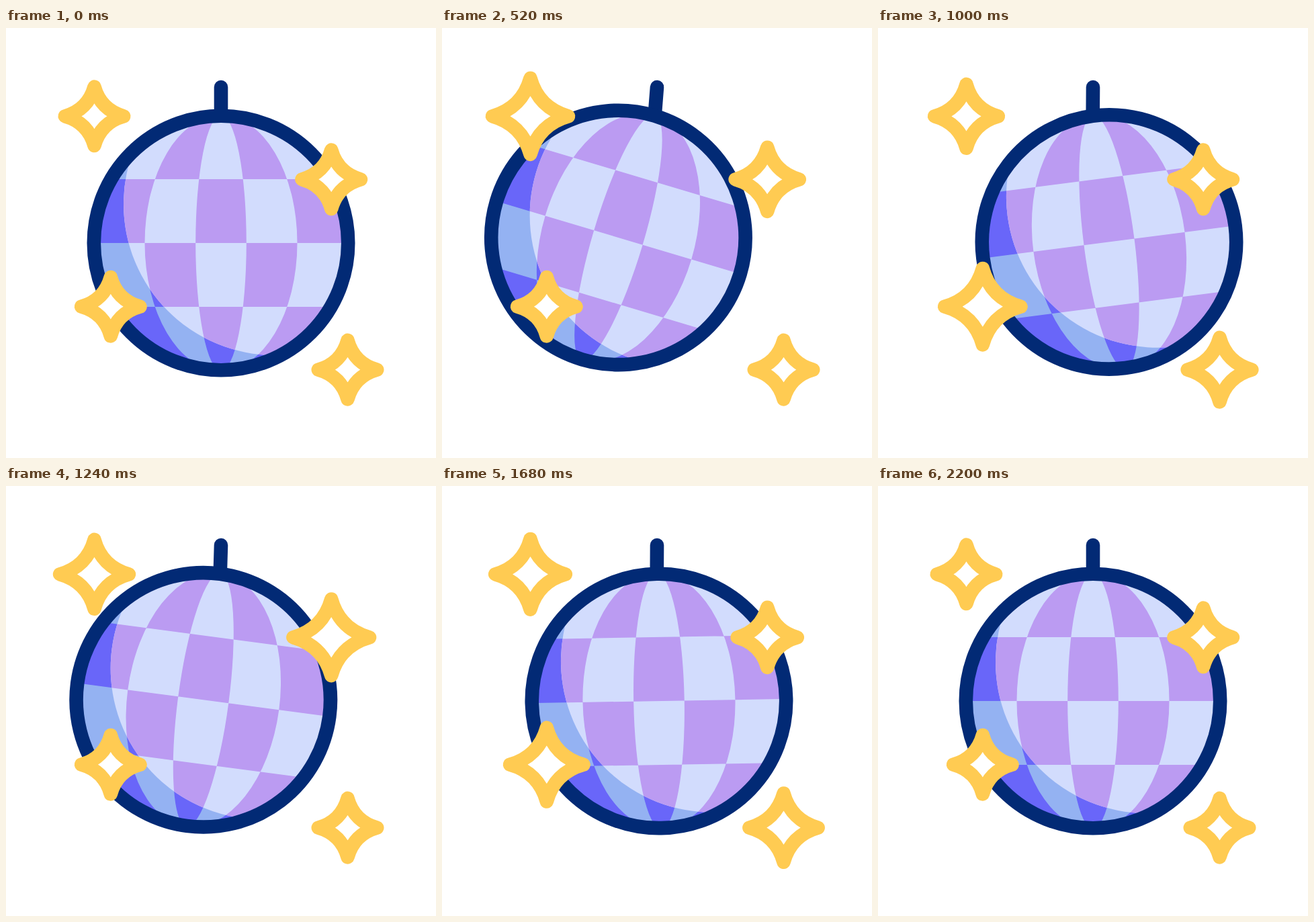
These frames come from a looping animation (640x640 px, 2240 ms). An HTML page:

```html
<!DOCTYPE html>
<html lang="en">
<head>
<meta charset="utf-8">
<title>Disco ball</title>
<style>
  html, body { margin: 0; width: 100%; height: 100%; overflow: hidden; background: #fff; }
  svg { display: block; width: 100vw; height: 100vh; }
  .line { fill: none; stroke: #022a75; stroke-width: 20.6; stroke-linecap: round; }
  .star { fill: #fff; stroke: #ffcb52; stroke-linejoin: round; }
</style>
</head>
<body>
<svg viewBox="0 0 640 640">
  <defs>
    <clipPath id="inside"><circle cx="320" cy="320" r="184"/></clipPath>
    <clipPath id="lit"><circle cx="400" cy="262" r="225"/></clipPath>
    <!-- Overlapping ellipses and bands give the checks through the even-odd rule -->
    <path id="checks" fill-rule="evenodd" d="
      M206.5 320a113.5 190 0 0 1 227 0a113.5 190 0 0 1 -227 0z
      M282.2 320a37.8 190 0 0 1 75.6 0a37.8 190 0 0 1 -75.6 0z
      M120 225h400v95h-400z M120 415h400v100h-400z"/>
  </defs>
  <path id="rod" class="line" d="M320 88V130"/>
  <g id="ball">
    <g clip-path="url(#inside)">
      <rect x="120" y="120" width="400" height="400" fill="#94b2f2"/>
      <use href="#checks" fill="#6966f9"/>
      <g clip-path="url(#lit)">
        <rect x="120" y="120" width="400" height="400" fill="#d2dcfd"/>
        <use href="#checks" fill="#bb9bf2"/>
      </g>
    </g>
    <circle class="line" cx="320" cy="320" r="189.2"/>
  </g>
  <g id="stars"></g>
</svg>
<script>
const LOOP = 2240, STEP = 40, STROKE = 20.6, ROD = 42;
const $ = id => document.getElementById(id);

// [time, degrees] at each turning point; the ball trails the rod
const rodSwing = [[100, 0], [460, 5], [860, -4], [1123, 4], [1440, -3.5], [1800, 1.6], [2120, 0]];
const ballSwing = [[120, 0], [520, 16.6], [908, -12], [1195, 8], [1540, -3], [1850, 1.8], [2160, 0]];

// pulses: [time of peak, half length]
const stars = [
  { x: 131.5, y: 131.3, pulses: [[500, 205], [1142, 220], [1800, 300]] },
  { x: 484.2, y: 225.3, pulses: [[660, 220], [1240, 220], [1865, 220]] },
  { x: 155.8, y: 414.7, pulses: [[237, 220], [985, 220], [1737, 220]] },
  { x: 508.5, y: 508.6, pulses: [[250, 220], [863, 220], [1570, 240]] }
];

function starPath(r, c) {
  return `M0 ${-r}Q${c} ${-c} ${r} 0Q${c} ${c} 0 ${r}Q${-c} ${c} ${-r} 0Q${-c} ${-c} 0 ${-r}z`;
}

for (const star of stars) {
  star.el = document.createElementNS("http://www.w3.org/2000/svg", "path");
  star.el.setAttribute("class", "star");
  star.el.setAttribute("d", starPath(43.7, 9.5));
  $("stars").append(star.el);
}

function swing(keys, t) {
  const i = keys.findIndex(k => k[0] > t);
  if (i < 1) return 0;
  const [t0, a] = keys[i - 1], [t1, b] = keys[i];
  return a + (b - a) * (1 - Math.cos(Math.PI * (t - t0) / (t1 - t0))) / 2;
}

function pulse(pulses, t) {
  const hit = pulses.find(([peak, half]) => Math.abs(t - peak) < half);
  return hit ? Math.cos(Math.PI / 2 * (t - hit[0]) / hit[1]) ** 2 : 0;
}

function draw(t) {
  const rod = swing(rodSwing, t), rad = rod * Math.PI / 180;
  const dx = -ROD * Math.sin(rad), dy = ROD * (Math.cos(rad) - 1);
  $("rod").setAttribute("transform", `rotate(${rod} 320 88)`);
  $("ball").setAttribute("transform", `translate(${dx} ${dy}) rotate(${swing(ballSwing, t)} 320 130)`);
  for (const { x, y, pulses, el } of stars) {
    const s = 1 + 0.3 * pulse(pulses, t);
    el.setAttribute("transform", `translate(${x} ${y}) scale(${s})`);
    el.setAttribute("stroke-width", STROKE / s);
  }
}

const start = performance.now();
function tick() {
  const t = Math.floor((performance.now() - start) % LOOP / STEP) * STEP;
  draw(t < 2 * STEP ? 0 : t);
  requestAnimationFrame(tick);
}
tick();
</script>
</body>
</html>
```
